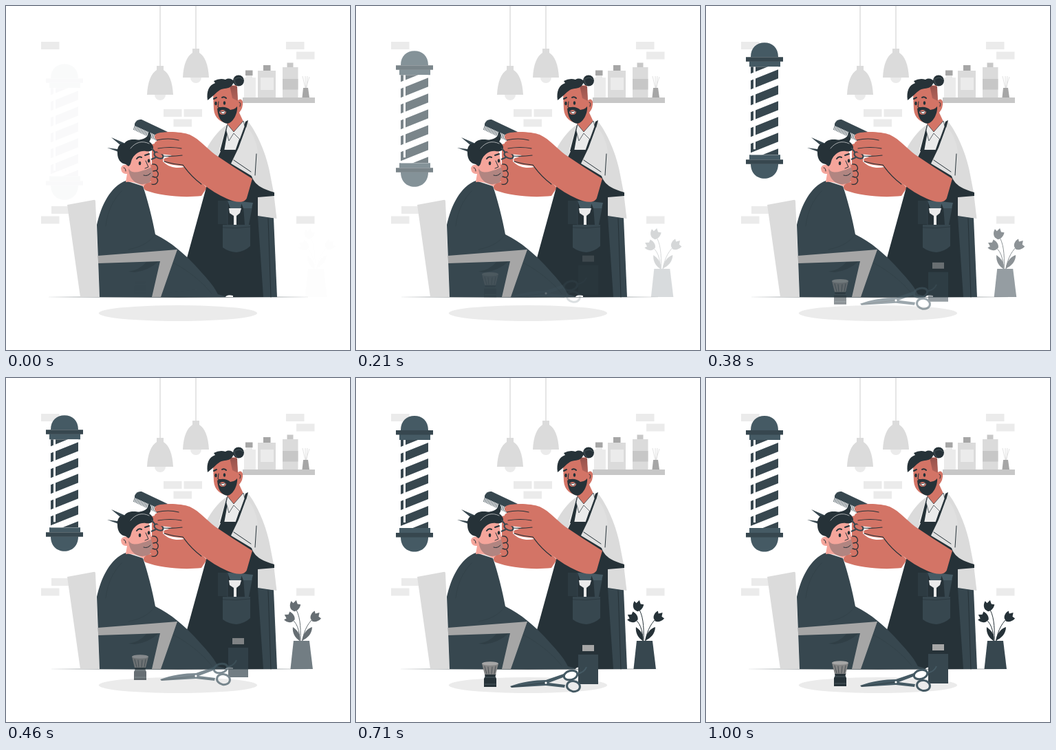
These frames come from a looping animation (500 px wide and 500 px high, 1040 ms). An HTML page:

```html
<!DOCTYPE html>
<html lang="en">
<head>
<meta charset="utf-8">
<title>Barber shop</title>
<style>
html, body { margin: 0; width: 100%; height: 100%; overflow: hidden; background: #fff; }
svg { display: block; width: 100vw; height: 100vh; }
.line { fill: none; stroke: #263238; stroke-width: 1; stroke-linecap: round; stroke-linejoin: round; }
.skin { fill: #d37466; }
.dark { fill: #263238; }
.slate { fill: #37474f; }
.steel { fill: #455a64; }
.pale { fill: #ebebeb; }
.light { fill: #dbdbdb; }
.mid { fill: #c7c7c7; }
.grey { fill: #a6a6a6; }
</style>
</head>
<body>
<svg viewBox="0 0 500 500">
  <defs>
    <clipPath id="tube"><rect x="65" y="90" width="40" height="128"/></clipPath>
    <linearGradient id="fade" x1="0" y1="0" x2="0" y2="1">
      <stop offset="0" stop-color="#96524b"/><stop offset="1" stop-color="#b3635a"/>
    </linearGradient>
    <g id="lamp">
      <circle cx="224" cy="129" r="8" class="pale"/>
      <path class="light" d="M223.3 0h1.4V87h4.3v6C237 98 242 110 243 129H205C206 110 211 98 219 93V87h4.3Z"/>
    </g>
    <path id="flower" d="M-3 8C-8 5-9-1-8-5L-4-3-1-9 3-4 8-5C9 2 6 7 2 9Z"/>
  </defs>

  <path id="bricks" class="pale"/>
  <use href="#lamp"/><use href="#lamp" x="52" y="-25"/>
  <ellipse cx="250" cy="446.500" rx="115" ry="11.500" class="pale"/>

  <!-- shelf -->
  <path class="mid" d="M344 133h105v8h-105zM408.500 82.500h9v7h-9z"/>
  <path class="pale" d="M349 101h9v3h5v29h-17v-29h3z"/>
  <path class="grey" d="M348 93.500h10.500v7.500H348zM374 86h10.500v8H374zM432 119h7l2 14h-10.500z"/>
  <path class="light" d="M366 94h26v39h-26zM402 89h22.500v44H402z"/>
  <path class="pale" d="M370 104h19v18h-19z"/>
  <path class="mid" d="M402 106h22.500v15.500H402z"/>
  <path d="M435 119L431 102M435.500 119L435 102M436 119L441 103M437 119L438 102" stroke="#dbdbdb" stroke-width=".8"/>

  <g id="pole">
    <path class="steel" d="M65 76C65 62 74 55 85 55S105 62 105 76ZM63 82h45v8H63zM63 218h45v7H63zM65 231C65 245 74 252.500 85 252.500S105 245 105 231Z"/>
    <path class="slate" d="M58 76h54v6.500H58zM58 225h54v6.500H58z"/>
    <path fill="#fff" d="M65 90h40v128H65z"/>
    <g clip-path="url(#tube)">
      <path id="stripes" class="slate"/>
      <path fill="#fff" d="M69 90h3v120h-3z"/>
    </g>
  </g>

  <g id="plant">
    <path class="line" d="M419 382C420 360 418 343 411 334M418 382C418 367 414 354 404 349M422 382C424 365 432 354 440 347" stroke-width="1.300"/>
    <path class="dark" d="M418 382C411 378 407 370 408 362C415 367 420 373 418 382ZM421 382C423 371 429 364 436 362C436 371 430 378 421 382Z"/>
    <g class="dark">
      <use href="#flower" transform="translate(411 331) rotate(20) scale(.9)"/>
      <use href="#flower" transform="translate(403 348) rotate(-55) scale(.9)"/>
      <use href="#flower" transform="translate(441 347) rotate(50) scale(.9)"/>
    </g>
    <path class="slate" d="M409 382h23l5 41h-32.500z"/>
  </g>

  <path class="dark" d="M54 423L250 422.200 447 423 250 423.800Z"/>

  <!-- barber, behind the arm -->
  <path class="slate" d="M365 304L389 308 394 423H372Z"/>
  <path class="line" d="M381 309L385 423" stroke-width=".7"/>
  <path class="light" d="M322 172C306 182 295 200 288 214L304 226 317 200ZM350 166C362 179 377 210 383 240L389 271 393.500 309 366 305V270L357 247 330 230 338 195Z"/>
  <path class="pale" d="M320 175L347 167 338 211H309Z"/>
  <path class="skin" d="M212 201C220 198 232 205 228 226C238 236 250 236 259 234L292 264 284 276C258 279 224 276 203 268C197 264 200 256 212 256Z"/>
  <path class="dark" d="M313 209H337L333 226 357 247C362 262 375 266 390 271V276L366 278V306L374 423H308L275 380 263 366 291 264 303 230Z"/>
  <path class="dark" d="M321 173L324 172 317 211H311ZM348 168L352 166 340 211H333Z"/>
  <path fill="#e0e0e0" d="M349 176C360 184 366 203 366 216L362 250 327 229 338 206Z"/>
  <path class="line" d="M364 215L362 246M331 224L356 241" stroke-width=".8"/>

  <!-- barber's head -->
  <path class="skin" d="M301 128L302 150C303 163 312 169 321 170L323 179 331 185 345 168 339 155Q345 148 344 139 342 133 337 137L335 115 308 118Z"/>
  <path class="pale" stroke="#263238" stroke-width=".7" d="M322 172L320 181 324 196 331 185 340 194 347 175 345 167 331 183Z"/>
  <path fill="url(#fade)" d="M325 115L336 117 337 138 329 134Z"/>
  <path class="dark" d="M307 149C313 145 322 147 326 151C329 150 332 151 336 146C337 155 331 169 322 171C312 170 308 161 307 149Z"/>
  <ellipse cx="315" cy="154.500" rx="5" ry="3.500" class="skin"/>
  <path d="M311 153Q315 155 319 152Q318 157 315 157Z" fill="#fff" stroke="#263238" stroke-width=".7"/>
  <path class="dark" d="M293 137C291 124 295 115 304 112L302 109Q311 104 319 107C324 104 329 106 332 110L328 116C323 121 317 119 311 122C305 126 300 132 293 137Z"/>
  <circle cx="338" cy="108.500" r="8" class="dark"/>
  <path d="M333 105C331 109 333 113 336 115M334 106C338 103 342 104 344 107" fill="none" stroke="#56656b" stroke-width=".7"/>
  <ellipse cx="305" cy="141.500" rx="1.800" ry="2.700" class="dark"/>
  <ellipse cx="317.500" cy="141" rx="1.800" ry="2.700" class="dark"/>
  <path class="line" d="M302 135L306 133M314 133Q317 131 320 134" style="stroke-width:2"/>
  <path class="line" d="M309 139L308 147 312 148M339 140Q342 140 340 146" stroke-width=".8"/>

  <!-- apron pocket -->
  <path class="slate" d="M315 318h40v31Q346 357 335 358 323 357 315 351ZM345 292h13l-5 26h-6z"/>
  <path class="steel" d="M322 283L343 284 341 294H326ZM341 284L359 286 357 294H345Z"/>
  <path class="pale" d="M324 294H342L340 301 335 305V318H331V305L325 301Z"/>
  <path id="pocketComb" stroke="#37474f" stroke-width=".9"/>
  <path class="line" d="M315 322Q334 324 355 321" style="stroke-width:.6"/>

  <!-- chair and customer -->
  <path class="light" d="M89 289L127 282Q130 281 130 284L136 423H108Z"/>
  <path class="slate" d="M174 254C152 262 138 290 132 318L136 423H322L308 419C300 403 290 394 275 377C260 361 240 343 217 332C213 310 206 282 199 262Z"/>
  <path class="line" d="M174 256Q188 256 199 263M145 320C147 299 156 281 168 269M217 332C206 346 195 350 178 354M243 373C267 386 285 401 299 418" style="stroke-width:.5" opacity=".45"/>
  <path class="dark" opacity=".4" d="M178 386Q194 384 204 372L222 371Q207 385 187 387Z"/>
  <path class="grey" d="M133.500 363L249 354 225 423H212L224 371 134 374Z"/>
  <path fill="#fff" d="M319 423Q321 419 330 421V423Z"/>

  <path fill="#f5a59b" d="M177 214L207 207 212 234 213 250 199 262Q186 254 174 256L176 244Q168 245 167 236 168 230 177 231Z"/>
  <path fill="#b18581" d="M178 236C184 246 195 240 203 238L212 234 215 246C215 257 200 261 192 258 183 255 179 247 178 236Z"/>
  <path class="slate" d="M153 191L176 201 172 207ZM147 206L169 209 169 214Z"/>
  <path class="dark" d="M162 214C161 205 165 199 172 200C177 192 188 194 194 195C204 192 213 199 214 205C214 211 208 212 203 211C194 210 188 215 184 221C181 226 182 231 178 233L174 230C166 229 162 222 162 214Z"/>
  <path class="dark" d="M190 195C202 194 210 189 206 180C213 186 212 196 204 201Z"/>
  <path class="line" d="M181 207C188 198 198 195 208 200" style="stroke:#fff;stroke-width:.6"/>
  <ellipse cx="194.500" cy="228.500" rx="1.800" ry="2.700" class="dark"/>
  <ellipse cx="207.500" cy="225" rx="1.800" ry="2.700" class="dark"/>
  <path class="line" d="M190 222Q193 218 197 220M202 217L208 215" style="stroke-width:2"/>
  <path class="line" d="M203 225L207 234 202 236M200 246Q206 248 210 243M171 235Q174 235 174 240" stroke-width=".8"/>
  <path class="skin" d="M210 231C216 228 222 232 220 239C223 243 222 247 219 249C223 254 219 260 212 259L209 252 214 246Z"/>
  <path class="line" d="M213 230C220 229 222 236 219 239L214 240M219 240C223 243 221 249 217 249L213 248M219 250C223 255 218 261 212 259" style="stroke-width:1.300"/>

  <!-- comb, hand scissors and near arm -->
  <path class="slate" d="M187 171Q190 164 197 165L235 183 230 193 187 174Z"/>
  <path id="comb" stroke="#37474f" stroke-width=".9"/>
  <g fill="none" stroke="#37474f" stroke-width="2">
    <ellipse cx="222" cy="217" rx="7" ry="4" transform="rotate(25 222 217)"/>
    <path d="M211 206L217 213M211 223L218 220"/>
  </g>
  <path class="skin" d="M218 186C230 181 256 183 267 187C282 194 293 208 304 216L331 234 358 251 350 279C347 287 334 286 321 280C296 269 274 250 258 233C246 231 236 231 230 226Q227 221 235 220L241 217 224 215Q216 211 222 207L216 204Q214 198 220 196 213 190 218 186Z"/>
  <path class="line" d="M219 195Q236 191 251 195M221 207Q239 204 255 207M228 218Q242 219 256 217M230 226Q243 230 257 231M257 231C263 239 268 247 284 259" style="stroke-width:1.200"/>

  <g id="tools">
    <path class="dark" d="M330 396h15v6h-15z"/>
    <path class="slate" d="M323 401h29v43h-29z"/>
    <path class="grey" d="M329 387h17v9h-17z"/>
    <g transform="translate(0 1)">
      <path class="dark" d="M187 428h16.500l-1 4 1.500 3v12h-18v-12l1.500-3z"/>
      <path fill="#858585" d="M183 413L187 429H203L207 413Z"/>
      <ellipse cx="195" cy="413" rx="12" ry="2.800" class="grey"/>
      <path class="line" d="M187 417L190 428M192 418L193 428M198 418L197 428M203 417L201 428" style="stroke-width:.6"/>
      <path d="M187 433h16.500M187 443h16.500" stroke="#56656b" stroke-width=".8"/>
      <path class="steel" d="M224 446C240 440 260 437 276 437L302 428 304 432 280 441 304 444 303 448 276 445 226 448Z"/>
      <path class="line" d="M226 447L276 441" style="stroke-width:.6"/>
      <g fill="none" stroke="#455a64" stroke-width="3">
        <ellipse cx="312" cy="430" rx="10" ry="6.500" transform="rotate(-15 312 430)"/>
        <ellipse cx="316" cy="446" rx="9.500" ry="7.500" transform="rotate(10 316 446)"/>
        <path d="M321 428Q332 426 335 418" stroke-width="2"/>
      </g>
      <circle cx="276" cy="441" r="1.600" fill="#fff"/>
    </g>
  </g>
</svg>
<script>
const $ = id => document.getElementById(id);
const LOOP = 1040, FRAME = 41.6, STEPS = 24, SLIDE = 30;
const repeat = (n, part) => Array.from({ length: n }, (_, i) => part(i)).join("");

$("bricks").setAttribute("d",
  [[51, 52], [407, 52], [422, 66.5], [229, 150], [258.5, 150], [243.5, 164.5], [66, 291], [51, 305.5], [422, 305.5]]
    .map(([x, y]) => `M${x} ${y}h26.500v11h-26.500z`).join(""));
$("stripes").setAttribute("d", repeat(7, i => `M65 ${87 + 23 * i}l40-16v13l-40 16z`));
$("comb").setAttribute("d", repeat(20, i => `M${188 + 2 * i} ${172 + 0.95 * i}l-2.500 8`));
$("pocketComb").setAttribute("d", "M322 283V318" + repeat(17, i => `M308 ${284 + 2 * i}h14`));

// Timing curve with a small overshoot: cubic-bezier(.36, -.01, .5, 1.38)
const bezier = (s, a, b) => 3 * (1 - s) ** 2 * s * a + 3 * (1 - s) * s * s * b + s ** 3;
function ease(x) {
  if (x >= 1) return 1;
  let low = 0, high = 1;
  for (let i = 0; i < 24; i++) {
    const s = (low + high) / 2;
    if (bezier(s, 0.36, 0.5) < x) low = s; else high = s;
  }
  return bezier(low, -0.01, 1.38);
}

function slideIn(id, progress, dx, dy) {
  const p = ease(progress), rest = SLIDE * (1 - p);
  $(id).setAttribute("transform", `translate(${dx * rest} ${dy * rest})`);
  $(id).setAttribute("opacity", Math.max(0, Math.min(1, p)));
}

function draw(time) {
  const step = Math.min(STEPS, Math.floor((time % LOOP + 4) / FRAME));
  // The opening pose holds for two steps.
  const progress = (step < 2 ? 0.5 : step) / STEPS + 0.02;
  slideIn("pole", progress * 2, 0, 1);
  slideIn("plant", progress, 1, 0);
  slideIn("tools", progress, 0, -1);
}

const start = performance.now();
function tick() {
  draw(performance.now() - start);
  requestAnimationFrame(tick);
}
tick();
</script>
</body>
</html>
```
